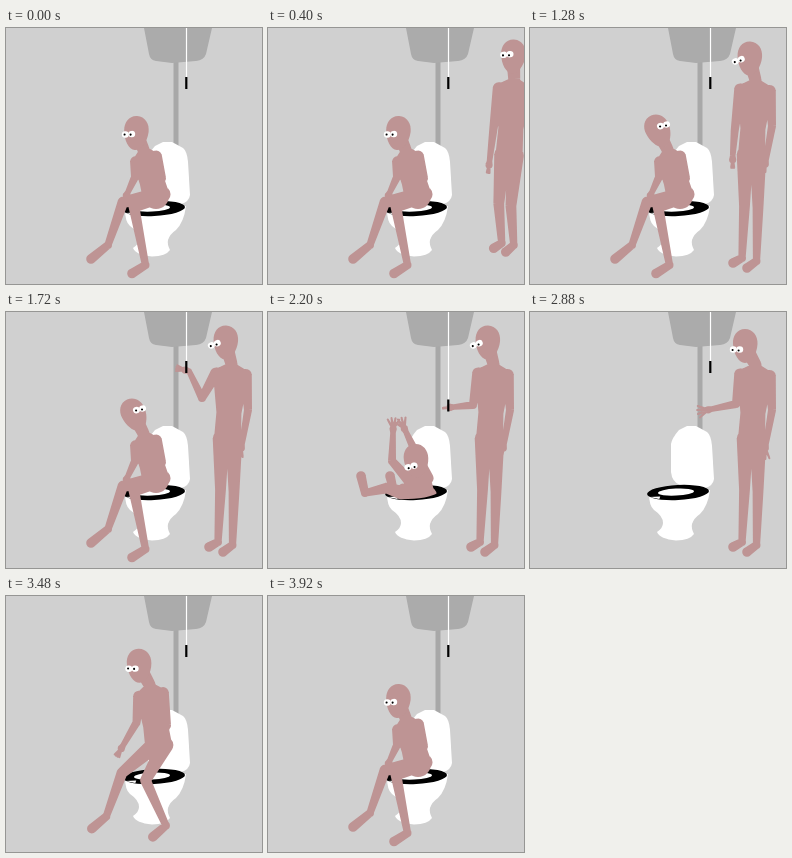
Recreate the animation shown at these times as an HTML page. Size 256 by 256 pixels, loop 4.04 s.

```html
<!DOCTYPE html>
<html lang="en">
<head>
<meta charset="utf-8">
<title>Flush</title>
<style>
html, body { margin: 0; width: 100%; height: 100%; overflow: hidden; background: #d0d0d0; }
svg { display: block; width: 100vw; height: 100vh; }
.man > path { fill: #be9494; }
</style>
</head>
<body>
<svg id="stage" viewBox="0 0 256 256">
  <defs>
    <clipPath id="rim"><path d="M0 0H256V176H178Q164 187 140 187L118 188H0Z"/></clipPath>
  </defs>
  <rect width="256" height="256" fill="#d0d0d0"/>
  <path fill="#a8a8a8" d="M167.5 30H172.5V120H167.5ZM165 192H173V198L167 203Z"/>
  <path fill="#ababab" d="M138 0L143 26Q144 32 150 33L166 35L190 33Q198 32 200 26L206 0Z"/>
  <path fill="#fff" d="M141 132Q142 126 149 118L157 114H166L177 120Q181 123 182 134L184 167Q183 174 175 176L150 173Q142 170 141 160Z"/>
  <path fill="#fff" d="M119 181Q119 194 124 198Q133 204 133 211Q133 216 127 220Q130 227 146 228.500Q160 228 164 222Q161 216 162 212Q164 206 170 202Q178 194 180 178Z"/>
  <g transform="rotate(-3 148 180)">
    <ellipse cx="148" cy="180.500" rx="31" ry="7.500"/>
    <ellipse cx="146" cy="180" rx="18" ry="3.500" fill="#fff"/>
    <path fill="#fff" d="M119 183.500L130 183.500L129 186Z"/>
  </g>
  <g id="sitter" class="man"></g>
  <g id="walker" class="man"></g>
  <g id="chain">
    <path d="M180.500 -60V50" stroke="#fff" stroke-width="1.200"/>
    <rect x="179.200" y="49" width="2.200" height="12"/>
  </g>
</svg>
<script>
const LOOP = 4040, STEP = 40;
const $ = id => document.getElementById(id);

// Poses: h head, c chest, p pelvis, e/w elbow and wrist, k/f/t knee, heel and toe; a and b are the sides.
const sit = {
  h: [130, 105], tilt: 4, eye: [122.500, 106.300], roll: -4, gaze: [-.9, 0], c: [140, 131], p: [150, 168], sh: 10.500,
  open: 0, bend: 0, ea: [129, 149], wa: [122, 164], eb: [156, 150], wb: [152, 166],
  ka: [117, 174], fa: [102, 217], ta: [85, 231], kb: [128, 179], fb: [139.500, 237], tb: [126, 245.500]
};
const look = { ...sit, h: [128, 103], tilt: -24, eye: [133.500, 97.300], roll: -15, gaze: [-.6, .3] };
const kick = {
  ...look, h: [136, 118], tilt: -20, eye: [137, 117], c: [148, 144], p: [152, 176], open: .7,
  ea: [124, 139], wa: [112, 120], eb: [150, 125], wb: [142, 106],
  ka: [113, 172], fa: [80, 196], ta: [72, 182], kb: [124, 178], fb: [112, 214], tb: [100, 208]
};
const sink = {
  ...kick, h: [148, 149], tilt: -5, eye: [143, 154.5], gaze: [.3, 1], c: [151, 168], p: [154, 184], sh: 9, open: 1,
  ea: [124, 149], wa: [125, 121], eb: [146, 137], wb: [138, 120],
  ka: [119, 176], fa: [97, 181], ta: [93, 164], kb: [135, 177], fb: [126, 180], tb: [122, 164]
};
const drain = {
  ...sink, h: [150, 178], eye: [145, 183], c: [152, 196], p: [153, 210],
  ea: [138, 178], wa: [136, 152], eb: [152, 170], wb: [148, 150],
  ka: [134, 190], fa: [127, 172], ta: [125, 156], kb: [140, 192], fb: [136, 174], tb: [134, 158]
};
const gone = shift(drain, 2, 62);

const stand = {
  h: [225.500, 28.5], tilt: 3, eye: [219.300, 26.500], roll: -6, gaze: [-.9, .5], c: [226, 61], p: [221.500, 127], sh: 15,
  open: 0, bend: 0, ea: [205.500, 104], wa: [204.500, 134], eb: [243, 104], wb: [239.500, 135],
  ka: [215, 178], fa: [215, 223], ta: [206, 226], kb: [228, 180], fb: [226.500, 233], tb: [217, 240]
};
const stride = {
  ...shift(stand, 6, 0), wa: [208, 133], wb: [247, 132],
  ka: [216, 178], fa: [214, 220], ta: [206, 224], kb: [238, 178], fb: [247, 212], tb: [239, 224]
};
const pass = {
  ...shift(stride, 22, 0), ka: [240, 174], fa: [246, 212], ta: [238, 218],
  kb: [246, 178], fb: [245, 220], tb: [237, 224]
};
const wait = {
  ...stand, h: [219.500, 30.500], tilt: 2, eye: [208.300, 32.300], roll: -20, c: [225, 62],
  eb: [242, 98], wb: [236, 132], ka: [214.500, 178], fa: [212, 230], ta: [203, 235]
};
const reach = { ...wait, ea: [196, 86], wa: [183, 59], open: .4, bend: -.9 };
const pull = { ...wait, ea: [205, 93], wa: [186, 95], open: -.3 };
const free = { ...pull, h: [215, 34], tilt: 0, eye: [206.500, 37.500], roll: 0, c: [225, 63], ea: [206, 92], wa: [182, 97], open: 1 };
const step = {
  ...free, h: [183, 35], eye: [174, 39], c: [192, 68], p: [190, 134], open: .5,
  ea: [175, 102], wa: [160, 128], eb: [208, 104], wb: [195, 136],
  ka: [170, 176], fa: [157, 217], ta: [145, 225], kb: [202, 183], fb: [219, 224], tb: [210, 237]
};
const cross = {
  ...step, h: [146, 45], tilt: -4, eye: [138.500, 49], gaze: [-.9, -.3], c: [153, 75], p: [152, 137], sh: 14, open: .8,
  ea: [136, 109], wa: [124, 134], eb: [168, 108], wb: [151, 141],
  ka: [124, 178], fa: [106, 227], ta: [93, 235], kb: [175, 186], fb: [217, 217], tb: [205, 231]
};
const turn = {
  ...cross, h: [134, 66], eye: [127, 69], c: [146, 95], p: [153, 148], sh: 12.500, open: .4,
  ea: [131, 124], wa: [117, 147], eb: [162, 125], wb: [151, 150],
  ka: [116, 178], fa: [100, 221], ta: [86, 233], kb: [142, 186], fb: [164, 228], tb: [151, 240]
};
const drop = {
  ...sit, h: [128, 89], eye: [121, 91], c: [140, 117], p: [151, 160],
  ea: [128, 139], wa: [119, 159], ka: [116, 171], kb: [127, 176]
};

const sitterKeys = [[0, sit], [760, sit], [1040, look], [1920, look], [2080, kick], [2200, sink], [2320, drain], [2440, gone]];
const walkerKeys = [
  [40, shift(stride, 44, 0)], [300, pass], [560, stride], [680, stand], [760, stand], [1120, wait], [1240, wait],
  [1720, reach], [1920, reach], [2200, pull], [2560, pull], [2880, free], [3040, step], [3200, cross],
  [3440, turn], [3680, drop], [3920, sit]
];
const chainKeys = [[1920, { y: 0 }], [2200, { y: 38.500 }], [2560, { y: 38.500 }], [2760, { y: 0 }]];

function shift(pose, dx, dy) {
  const out = { ...pose };
  for (const k in out) if (Array.isArray(out[k]) && k !== 'gaze') out[k] = [out[k][0] + dx, out[k][1] + dy];
  return out;
}
function mix(a, b, u) {
  return Array.isArray(a) ? a.map((v, i) => v + (b[i] - v) * u) : a + (b - a) * u;
}
function poseAt(keys, t) {
  const n = keys.findIndex(k => k[0] > t);
  if (n < 0) return keys[keys.length - 1][1];
  if (n === 0) return keys[0][1];
  const [t0, a] = keys[n - 1], [t1, b] = keys[n], out = {};
  for (const k in a) out[k] = mix(a[k], b[k], (t - t0) / (t1 - t0));
  return out;
}

const add = (p, d, s = 1) => [p[0] + d[0] * s, p[1] + d[1] * s];
const dir = (a, b) => {
  const x = b[0] - a[0], y = b[1] - a[1], l = Math.hypot(x, y) || 1;
  return [x / l, y / l];
};
const polar = a => [Math.cos(a), Math.sin(a)];
const num = p => p[0].toFixed(2) + ' ' + p[1].toFixed(2);
const disc = (p, r) => `M${num(add(p, [-r, 0]))}a${r} ${r} 0 1 0 ${2 * r} 0a${r} ${r} 0 1 0 ${-2 * r} 0Z`;

// Tapered strip through the points, with a radius for each.
function strip(pts, radii, round = true) {
  let d = '';
  pts.forEach((p, i) => {
    if (round) d += disc(p, radii[i]);
    const q = pts[i + 1];
    if (!q) return;
    const [x, y] = dir(p, q), n = [-y, x], r = radii[i], s = radii[i + 1];
    d += `M${num(add(p, n, r))}L${num(add(q, n, s))}L${num(add(q, n, -s))}L${num(add(p, n, -r))}Z`;
  });
  return d;
}
function arm(shoulder, elbow, wrist, open, bend = 0) {
  const [x, y] = dir(elbow, wrist), aim = Math.atan2(y, x) + bend, palm = add(wrist, polar(aim), 4);
  let d = strip([shoulder, elbow, wrist, palm], [5.8, 4, 2.8, 3.6]);
  for (let i = -1.5; i <= 1.5; i++) {
    d += strip([palm, add(palm, polar(aim + i * (.12 + .25 * open)), 8 + 3 * open)], [1.5, 1]);
  }
  return d;
}
const leg = (hip, knee, heel, toe) =>
  strip([hip, knee, heel], [8.3, 5.4, 3.6]) + strip([heel, toe], [4, 4.8]);

function body(m) {
  const axis = dir(m.c, m.p), side = [axis[1], -axis[0]];
  const sa = add(m.c, side, -m.sh), sb = add(m.c, side, m.sh);
  const waist = mix(m.c, m.p, .6), nape = add(m.c, axis, -10), yoke = add(m.c, axis, -4);
  return arm(sb, m.eb, m.wb, m.open) + arm(sa, m.ea, m.wa, m.open, m.bend)
    + strip([sa, sb], [5.8, 5.8])
    + strip([nape, yoke], [5, m.sh + 1], false)
    + strip([m.c, waist, m.p], [m.sh + 3, 12.5, 13.5], false) + disc(m.p, 13)
    + strip([m.h, nape, m.c], [7, 6, 7])
    + leg(add(m.p, side, 6.5), m.kb, m.fb, m.tb) + leg(add(m.p, side, -6.5), m.ka, m.fa, m.ta);
}

function figure(id) {
  const g = $(id);
  g.innerHTML = '<path/><path d="M0 -17C8 -17 13 -10 12.500 -2C12 8 6 17 0 17C-6 17 -11.500 8 -12 -2C-12.500 -10 -8 -17 0 -17Z"/>'
    + '<g><ellipse cx="-3.200" rx="3.500" ry="3.200" fill="#fff"/><ellipse cx="3.200" rx="3.500" ry="3.200" fill="#fff"/>'
    + '<g><circle cx="-3" r="1.050"/><circle cx="3" cy=".5" r="1.050"/></g></g>';
  const [torso, head, eyes] = g.children, pupils = eyes.lastElementChild;
  return m => {
    g.style.display = m ? '' : 'none';
    if (!m) return;
    torso.setAttribute('d', body(m));
    head.setAttribute('transform', `translate(${num(m.h)}) rotate(${m.tilt})`);
    eyes.setAttribute('transform', `translate(${num(m.eye)}) rotate(${m.roll})`);
    pupils.setAttribute('transform', `translate(${num(m.gaze)})`);
  };
}

const drawSitter = figure('sitter'), drawWalker = figure('walker');
const stage = $('stage'), sitter = $('sitter'), chain = $('chain');

function render(t) {
  drawSitter(t < 2440 ? poseAt(sitterKeys, t) : null);
  drawWalker(t >= 40 ? poseAt(walkerKeys, t) : null);
  if (t >= 2200) sitter.setAttribute('clip-path', 'url(#rim)');
  else sitter.removeAttribute('clip-path');
  chain.setAttribute('transform', `translate(0 ${poseAt(chainKeys, t).y})`);
  // In front of the gripping hand, behind the passing body.
  stage.insertBefore(chain, t < 2700 ? null : sitter);
}

const start = performance.now();
function tick() {
  const t = (performance.now() - start) % LOOP;
  render(Math.floor(t / STEP) * STEP);
  requestAnimationFrame(tick);
}
tick();
</script>
</body>
</html>
```
